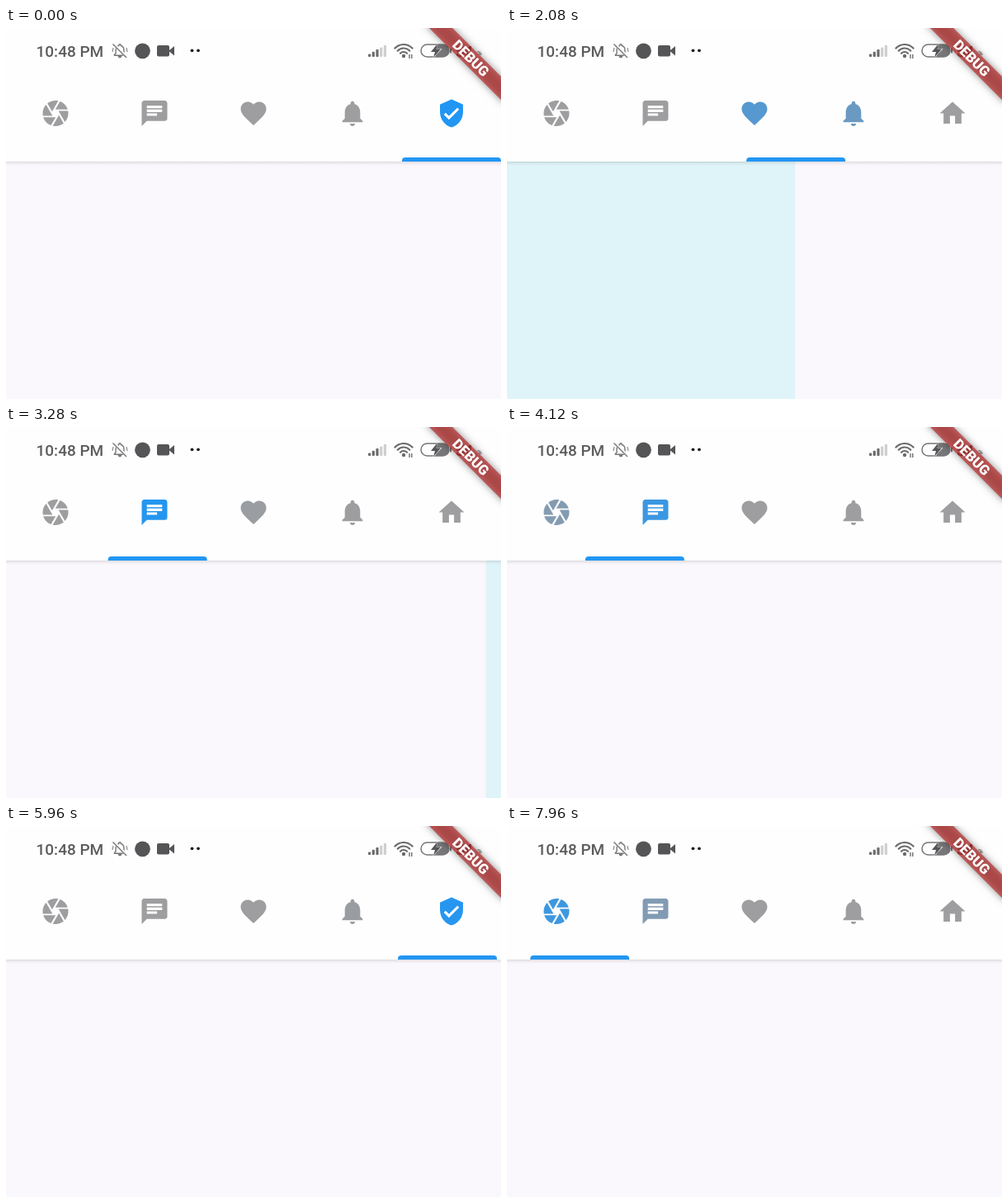
An HTML page with a canvas that plays this animation: 600 px wide and 450 px high, repeating every 8000 ms.

```html
<!DOCTYPE html>
<html lang="en">
<head>
<meta charset="utf-8">
<title>Tab bar</title>
<style>
  html, body { margin: 0; width: 100%; height: 100%; overflow: hidden; background: #fff; }
  canvas { display: block; width: 600px; height: 450px; }
</style>
</head>
<body>
<canvas id="stage" width="600" height="450"></canvas>
<script>
const ctx = document.getElementById('stage').getContext('2d');
const LOOP = 8000, W = 600, H = 450, TAB = 120, BAR = 162;
const GREY = [158, 157, 159], BLUE = [33, 150, 243];
const PAGES = ['#faf8fc', '#faf8fc', '#dff4f9', '#faf8fc', '#faf8fc'];

const ICONS = {
  camera: 'M9.4 10.5l4.77-8.26C13.47 2.09 12.75 2 12 2c-2.4 0-4.6.85-6.32 2.25l3.66 6.35.06-.1z' +
    'M21.54 9c-.92-2.92-3.15-5.26-6-6.34L11.88 9h9.66zm.26 1h-7.49l.29.5 4.76 8.25C20.98 16.97 22 14.61 22 12c0-.69-.07-1.35-.2-2z' +
    'M8.54 12l-3.9-6.75C3.01 7.03 2 9.39 2 12c0 .69.07 1.35.2 2h7.49l-1.15-2zm-6.08 3c.92 2.92 3.15 5.26 6 6.34L12.12 15H2.46z' +
    'm11.27 0l-3.9 6.76c.7.15 1.42.24 2.17.24 2.4 0 4.6-.85 6.32-2.25l-3.66-6.35-.93 1.6z',
  chat: 'M20 2H4c-1.1 0-1.99.9-1.99 2L2 22l4-4h14c1.1 0 2-.9 2-2V4c0-1.1-.9-2-2-2zM6 9h12v2H6V9zm8 5H6v-2h8v2zm4-6H6V6h12v2z',
  heart: 'M12 21.35l-1.45-1.32C5.4 15.36 2 12.28 2 8.5 2 5.42 4.42 3 7.5 3c1.74 0 3.41.81 4.5 2.09C13.09 3.81 14.76 3 16.5 3 19.58 3 22 5.42 22 8.5c0 3.78-3.4 6.86-8.55 11.54L12 21.35z',
  bell: 'M12 22c1.1 0 2-.9 2-2h-4c0 1.1.89 2 2 2zm6-6v-5c0-3.07-1.64-5.64-4.5-6.32V4c0-.83-.67-1.5-1.5-1.5s-1.5.67-1.5 1.5v.68C7.63 5.36 6 7.92 6 11v5l-2 2v1h16v-1l-2-2z',
  home: 'M10 20v-6h4v6h5v-8h3L12 3 2 12h3v8z',
  shield: 'M12 1L3 5v6c0 5.55 3.84 10.74 9 12 5.16-1.26 9-6.45 9-12V5l-9-4zm-2 16l-4-4 1.41-1.41L10 14.17l6.59-6.59L18 9l-8 8z'
};
for (const k in ICONS) ICONS[k] = new Path2D(ICONS[k]);
const TABS = ['camera', 'chat', 'heart', 'bell', 'home'];

// Swipes: start, duration, tab reached
const SWIPES = [
  [520, 400, 3], [1860, 400, 2], [2926, 400, 1], [4000, 400, 0],
  [4836, 260, 1], [5100, 220, 2], [5320, 220, 3], [5700, 300, 4],
  [6080, 300, 3], [6440, 360, 2], [7140, 360, 1], [7717, 360, 0]
];

function tabAt(t) {
  let pos = 4;
  for (const [start, dur, to] of SWIPES) {
    if (t <= start) break;
    const p = Math.min(1, (t - start) / dur);
    pos += (to - pos) * (1 - Math.cos(Math.PI * p)) / 2;
  }
  return pos;
}

const mix = (a, b, k) => `rgb(${a.map((v, i) => Math.round(v + (b[i] - v) * k))})`;

function rect(x, y, w, h, color) {
  ctx.fillStyle = color;
  ctx.fillRect(x, y, w, h);
}

function rounded(x, y, w, h, r, color) {
  ctx.fillStyle = color;
  ctx.beginPath();
  ctx.roundRect(x, y, w, h, r);
  ctx.fill();
}

function dot(x, y, r, color) {
  ctx.fillStyle = color;
  ctx.beginPath();
  ctx.arc(x, y, r, 0, Math.PI * 2);
  ctx.fill();
}

function poly(points, color) {
  ctx.fillStyle = color;
  ctx.beginPath();
  points.forEach(([x, y]) => ctx.lineTo(x, y));
  ctx.fill();
}

function line(x1, y1, x2, y2, width, color) {
  ctx.strokeStyle = color;
  ctx.lineWidth = width;
  ctx.beginPath();
  ctx.moveTo(x1, y1);
  ctx.lineTo(x2, y2);
  ctx.stroke();
}

function icon(name, cx, cy, scale, color, outline) {
  ctx.save();
  ctx.translate(cx, cy);
  ctx.scale(scale, scale);
  ctx.translate(-12, -12);
  if (outline) {
    ctx.strokeStyle = color;
    ctx.lineWidth = outline;
    ctx.stroke(ICONS[name]);
  } else {
    ctx.fillStyle = color;
    ctx.fill(ICONS[name], 'evenodd');
  }
  ctx.restore();
}

function text(str, x, y, font, color) {
  ctx.font = font + ' Roboto, sans-serif';
  ctx.fillStyle = color;
  ctx.fillText(str, x, y);
}

function statusBar() {
  const ink = '#5c5c5e';
  text('10:48 PM', 36.5, 34.5, '500 19px', ink);

  // Muted bell
  icon('bell', 138, 27.5, 0.82, '#77777a', 1.7);
  line(130, 19, 147, 36, 3.4, '#fefefe');
  line(129.5, 19.5, 146, 36, 1.4, '#77777a');
  line(130, 24, 129, 29, 1.2, '#88888a');
  line(146, 24, 147, 29, 1.2, '#88888a');

  dot(165.5, 27.8, 9.4, '#555557');
  rounded(183, 21, 15, 13.5, 2, '#555557');
  poly([[197, 27.7], [204, 22], [204, 33.6]], '#555557');
  dot(225.5, 27.3, 1.9, '#222');
  dot(233, 27.3, 1.9, '#222');

  // Signal
  for (let i = 0; i < 5; i++) {
    const h = 3.5 + i * 2.7;
    rounded(439 + i * 4.7, 35 - h, 3.2, h, 1, i < 3 ? '#6c6c6e' : '#cfcfd1');
  }

  // Wi-Fi
  ctx.lineCap = 'round';
  for (const r of [5.5, 10, 14.5]) {
    ctx.strokeStyle = '#6a6a6c';
    ctx.lineWidth = 2.2;
    ctx.beginPath();
    ctx.arc(482, 34.5, r, -Math.PI * 0.76, -Math.PI * 0.24);
    ctx.stroke();
  }
  ctx.lineCap = 'butt';
  dot(482, 34, 2.2, '#6a6a6c');
  line(489, 32, 489, 37, 1.2, '#555');
  line(491.8, 32, 491.8, 37, 1.2, '#555');

  // Charging battery
  ctx.save();
  ctx.beginPath();
  ctx.roundRect(503, 20, 34, 15, 7.5);
  ctx.clip();
  rect(503, 19, 18, 17, '#fefefe');
  rect(521, 19, 17, 17, '#77777a');
  ctx.restore();
  ctx.strokeStyle = '#77777a';
  ctx.lineWidth = 1.5;
  ctx.beginPath();
  ctx.roundRect(503, 20, 34, 15, 7.5);
  ctx.stroke();
  rounded(538, 24.5, 2, 6, 1, '#77777a');
  const bolt = [[523, 19], [515, 29], [520, 29], [518, 36], [527, 25.5], [521.5, 25.5]];
  ctx.save();
  ctx.translate(521, 27.5);
  ctx.scale(1.25, 1.1);
  ctx.translate(-521, -27.5);
  poly(bolt, '#fefefe');
  ctx.restore();
  poly(bolt, '#555557');

  text('54', 544.5, 34.5, '500 19px', ink);
  text('%', 571, 33, '500 8px', ink);
}

function ribbon() {
  ctx.save();
  ctx.translate(563.5, 36.5);
  ctx.rotate(Math.PI / 4);
  // Only the shadow of the first strip falls on the stage
  ctx.shadowColor = 'rgba(0,0,0,0.43)';
  ctx.shadowBlur = 10;
  ctx.shadowOffsetX = 2000;
  ctx.fillStyle = '#000';
  const far = 2000 / Math.SQRT2;
  ctx.fillRect(-67 - far, -10 + far, 134, 20);
  ctx.shadowColor = 'transparent';
  rect(-90, -10, 180, 20, 'rgba(183,28,28,0.627)');
  ctx.textAlign = 'center';
  text('DEBUG', 0, 6, '900 17px', '#fff');
  ctx.restore();
}

function draw(t) {
  const pos = tabAt(t);
  rect(0, 0, W, H, '#fefefe');
  PAGES.forEach((color, i) => {
    const x = (i - pos) * W;
    if (Math.abs(x) < W) rect(x, BAR, W + (i < 4 ? 1 : 0), H - BAR, color);
  });

  const shade = ctx.createLinearGradient(0, BAR, 0, BAR + 5);
  shade.addColorStop(0, 'rgba(0,0,0,0.12)');
  shade.addColorStop(0.4, 'rgba(0,0,0,0.05)');
  shade.addColorStop(1, 'rgba(0,0,0,0)');
  rect(0, BAR, W, 5, shade);

  TABS.forEach((name, i) => {
    const active = Math.max(0, 1 - Math.abs(i - pos));
    const shown = name === 'home' && active > 0.5 ? 'shield' : name;
    icon(shown, i * TAB + 60, 103.5, 1.55, mix(GREY, BLUE, active));
  });
  rounded(pos * TAB, 157, TAB, 5, [4, 4, 0, 0], mix(BLUE, BLUE, 0));

  statusBar();
  ribbon();
}

function frame() {
  draw(performance.now() % LOOP);
  requestAnimationFrame(frame);
}
frame();
</script>
</body>
</html>
```
